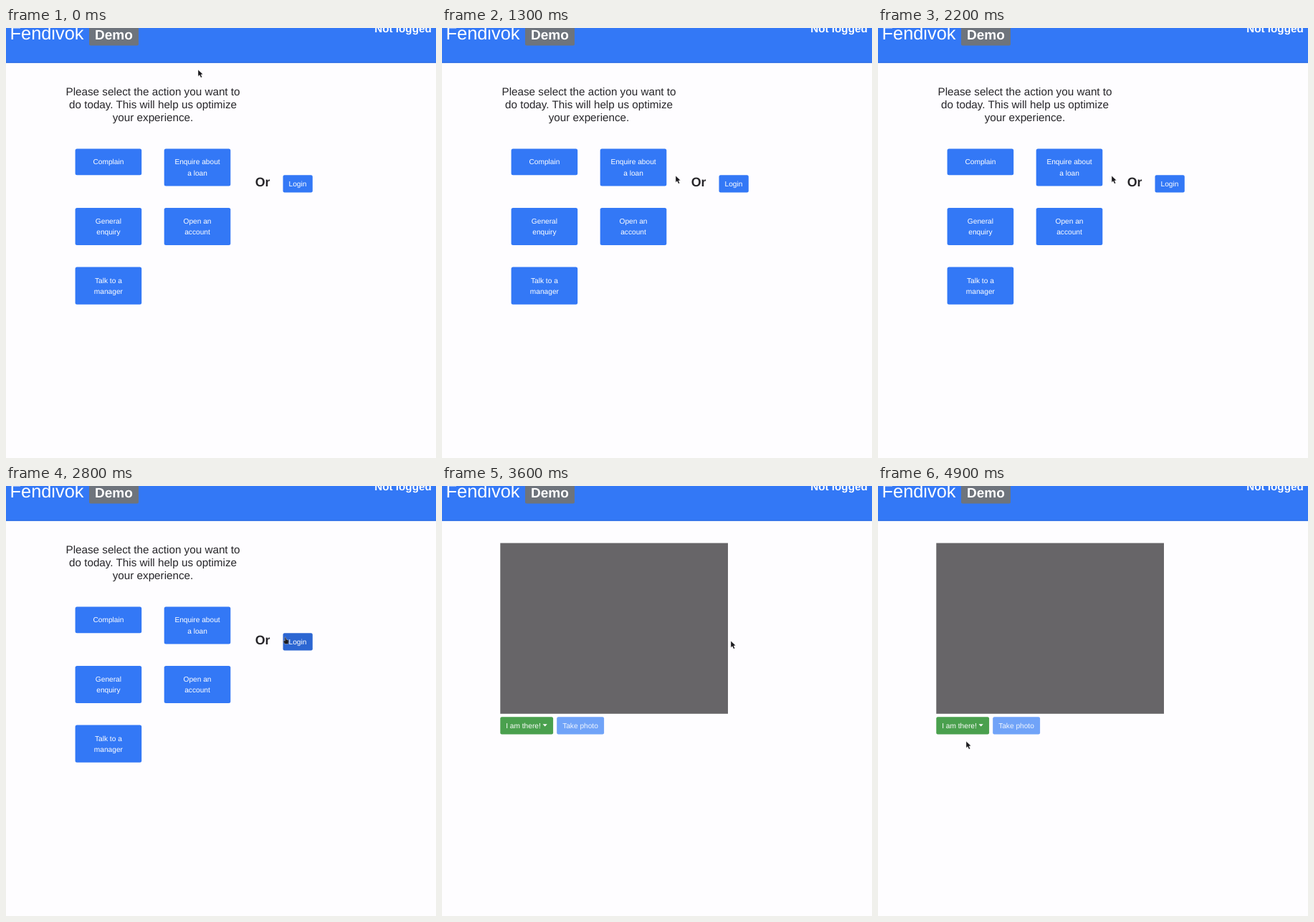
An HTML page that plays this animation: 600 px wide and 600 px high, repeating every 5000 ms.

```html
<!DOCTYPE html>
<html lang="en">
<head>
<meta charset="utf-8">
<title>Kiosk demo</title>
<style>
  html, body { margin: 0; width: 100%; height: 100%; overflow: hidden; background: #fefdff; }
  svg { display: block; width: 600px; height: 600px; }
  text { font-family: "Liberation Sans", Arial, sans-serif; font-size: 10.16px; fill: #fff; text-rendering: geometricPrecision; }
  .mid { text-anchor: middle; }
  .bold { font-weight: bold; }
  .dark { fill: #27262a; }
  .lead { font-size: 15.24px; }
  #camera, #hand { opacity: 0; }
</style>
</head>
<body>
<svg viewBox="0 0 600 600">
  <rect width="600" height="600" fill="#fefdff"/>
  <rect width="600" height="48.7" fill="#3378f6"/>
  <rect y="47.5" width="600" height="1.2" fill="#2f6fe3"/>
  <text x="5.5" y="16" style="font-size:25.4px">Fendivok</text>
  <path d="M116 0H185V22.5Q185 24.5 183 24.5H118Q116 24.5 116 22.5Z" fill="#6e747c"/>
  <text class="bold" x="124" y="16" style="font-size:19.05px">Demo</text>
  <text class="bold lead" x="514.2" y="6">Not logged</text>

  <g id="menu">
    <g id="intro"></g>
    <g id="actions"></g>
    <text class="bold dark" x="347.7" y="221.4" style="font-size:17.78px">Or</text>
    <rect id="login" x="386.5" y="205.3" width="41.3" height="24.2" rx="2.2" fill="#3378f6"/>
    <text class="mid" x="407" y="220.7">Login</text>
  </g>

  <g id="camera">
    <rect x="81.3" y="79.6" width="317.7" height="238.2" fill="#676568"/>
    <rect x="81.3" y="322.3" width="73.8" height="24.2" rx="2.2" fill="#4aa04e"/>
    <text x="89.2" y="337.7">I am there!</text>
    <path d="M140.6 332.3h6.2l-3.1 3.1z" fill="#fff"/>
    <rect x="160.2" y="322.3" width="65.9" height="24.2" rx="2.2" fill="#70a3f8"/>
    <text class="mid" x="193" y="337.7" fill-opacity=".9">Take photo</text>
  </g>

  <g id="cursor">
    <path id="arrow" d="M0 .3V9.4L2.1 7.6 3.9 11.3 5.6 10.5 4 7 6.7 6.6Z" fill="#1b1a1e" stroke="#fff" stroke-width=".5" stroke-opacity=".7"/>
    <path id="hand" d="M1.2-2.8Q2.2-3.6 2.9-2.4L3.6 .2 6.2 .9Q7 1.2 6.9 2.4L6.3 6.6H1.6L-.2 4.2-.6 1.6 1.7 2Z" fill="#1b1a1e" stroke="#fff" stroke-width=".5" stroke-opacity=".7"/>
  </g>
</svg>
<script>
const LOOP = 5000, STEP = 100;
const $ = id => document.getElementById(id);

function add(parent, tag, attrs, label) {
  const el = document.createElementNS("http://www.w3.org/2000/svg", tag);
  for (const key in attrs) el.setAttribute(key, attrs[key]);
  if (label) el.textContent = label;
  parent.append(el);
}

["Please select the action you want to", "do today. This will help us optimize", "your experience."]
  .forEach((line, i) => add($("intro"), "text", { class: "mid dark lead", x: 205, y: 93.6 + i * 18 }, line));

[["Complain"], ["Enquire about", "a loan"], ["General", "enquiry"], ["Open an", "account"], ["Talk to a", "manager"]]
  .forEach((lines, i) => {
    const x = 96.6 + (i % 2) * 124.1, y = 168.4 + Math.floor(i / 2) * 82.6;
    add($("actions"), "rect", { x, y, width: 92.6, height: 21.6 + lines.length * 15.24, rx: 2.5, fill: "#3378f6" });
    lines.forEach((line, j) =>
      add($("actions"), "text", { class: "mid", x: x + 46.3, y: y + 22 + j * 15.24 }, line));
  });

// Pointer moves: start, end, target x, target y, easing
const smooth = p => p * p * (3 - 2 * p), linear = p => p;
const moves = [
  [0, 600, 326, 206, smooth],
  [2400, 2900, 403, 216, linear],
  [3600, 4200, 123, 356, smooth]
];

function pointer(t) {
  let x = 268, y = 58;
  for (const [from, to, tx, ty, ease] of moves) {
    const p = ease(Math.min(1, Math.max(0, (t - from) / (to - from))));
    x += (tx - x) * p;
    y += (ty - y) * p;
  }
  return `translate(${x}px, ${y}px)`;
}

// Plays a value that is held for each step of the loop
function play(id, prop, valueAt) {
  const frames = [];
  for (let t = 0; t <= LOOP; t += STEP)
    frames.push({ offset: t / LOOP, [prop]: valueAt(t), easing: "steps(1, end)" });
  $(id).animate(frames, { duration: LOOP, iterations: Infinity });
}

const SWITCH = 2900;
const hover = t => t >= 2800 && t < SWITCH;
play("cursor", "transform", pointer);
play("menu", "opacity", t => t < SWITCH ? 1 : 0);
play("camera", "opacity", t => t < SWITCH ? 0 : 1);
play("login", "fill", t => hover(t) ? "#2c66d2" : "#3378f6");
play("arrow", "opacity", t => hover(t) ? 0 : 1);
play("hand", "opacity", t => hover(t) ? 1 : 0);
</script>
</body>
</html>
```
